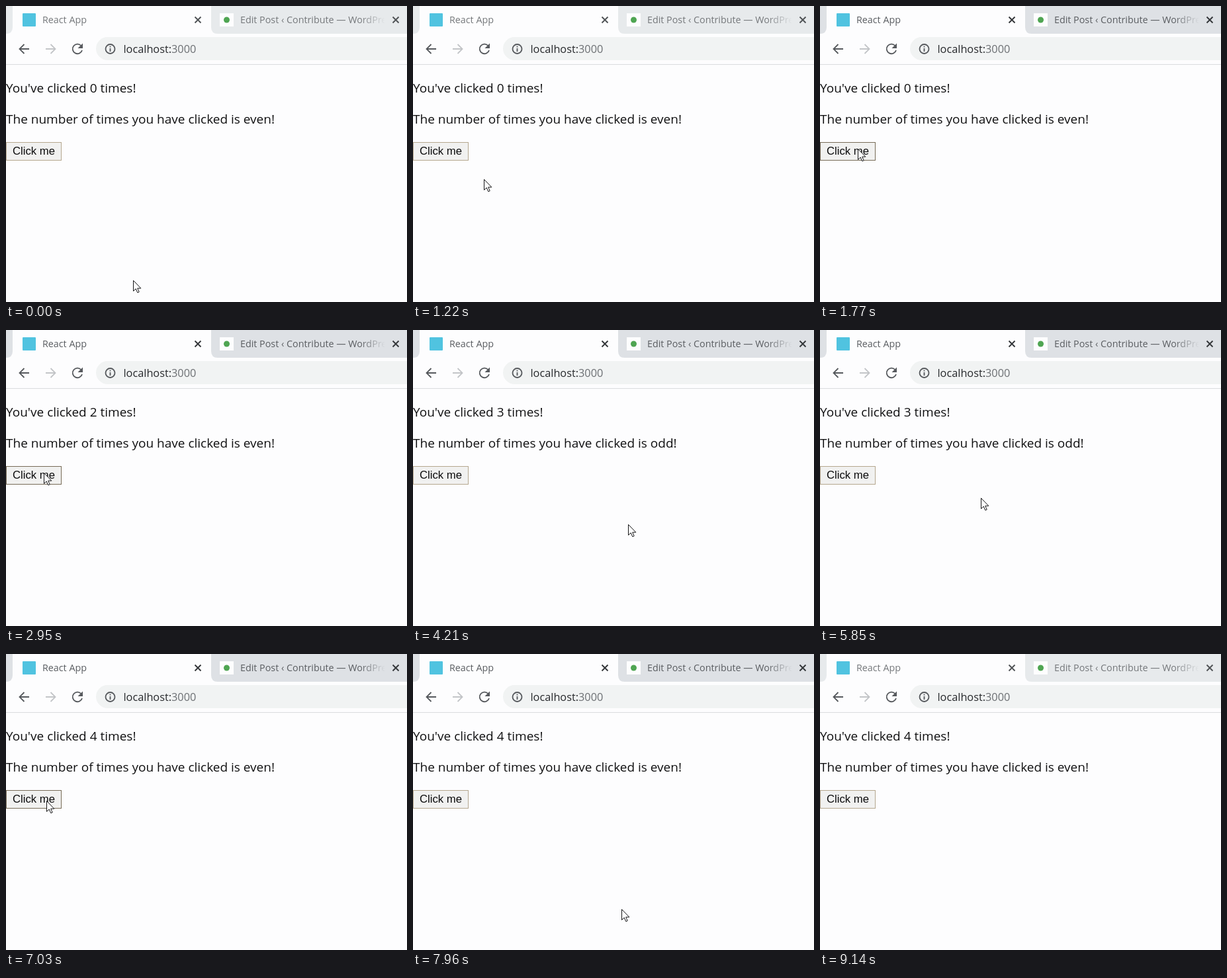
Write an HTML page that moves like this. It is 606 by 448 pixels and loops after 9190 ms.

```html
<!DOCTYPE html>
<html lang="en">
<head>
<meta charset="utf-8">
<title>Click counter</title>
<style>
  html, body { margin: 0; width: 100%; height: 100%; overflow: hidden; background: #fdfdfe; }
  svg { display: block; width: 606px; height: 448px; font-family: "Open Sans", "Noto Sans", sans-serif; }
  svg { --strip: #e7eaec; --title: #75787b; --close: #505356; }
  svg.focused { --strip: #dee1e5; --title: #5a5d61; --close: #34373a; }
  .strip { fill: var(--strip); }
  .title { fill: var(--title); font-size: 14.3px; }
  .close { stroke: var(--close); stroke-width: 1.9; }
  .url { font-size: 16.3px; fill: #27292c; }
  .page { font-size: 19px; fill: #101011; }
  .button { fill: #f1f1f0; stroke: #b5a78e; }
  .button.hover { stroke: #776b57; }
  .label { font: 16.7px "Liberation Sans", Arial, sans-serif; fill: #0b0b0c; }
  .icon { fill: none; stroke: #56595d; stroke-width: 1.8; }
</style>
</head>
<body>
<svg viewBox="0 0 606 448">
  <defs>
    <linearGradient id="fade" gradientUnits="userSpaceOnUse" x1="535" x2="573" y1="0" y2="0">
      <stop offset="0" style="stop-color: var(--title)"/>
      <stop offset="1" style="stop-color: var(--title); stop-opacity: 0"/>
    </linearGradient>
    <path id="cross" d="M-4.5 -4.5L4.5 4.5M4.5 -4.5L-4.5 4.5"/>
    <path id="arrow" d="M8 0H-6.5M0.5 -7L-6.5 0L0.5 7"/>
  </defs>
  <rect width="606" height="448" fill="#fdfdfe"/>

  <!-- Tabs -->
  <path class="strip" d="M0 0H10V32Q10 42 0 42ZM310 0H606V42H320Q310 42 310 32Z"/>
  <rect x="25" y="11" width="20" height="20" rx="1" fill="#50c3e0"/>
  <text class="title" x="55" y="26">React App</text>
  <use href="#cross" class="close" x="290" y="21"/>
  <rect x="323" y="11" width="21" height="20" fill="#fdfdfe"/>
  <circle cx="333.5" cy="21" r="4.5" fill="#4fa552"/>
  <text class="title" x="354" y="26" style="fill: url(#fade)">Edit Post ‹ Contribute — WordPress</text>
  <use href="#cross" class="close" x="589" y="21"/>

  <!-- Toolbar -->
  <use href="#arrow" class="icon" x="27" y="65"/>
  <use href="#arrow" class="icon" transform="translate(68 65) scale(-1 1)" style="stroke: #c3c5c8"/>
  <path class="icon" d="M113.4 60A7.3 7.3 0 1 0 115 67"/>
  <path d="M116 56.5V64H108.5Z" fill="#56595d"/>
  <rect x="136" y="47" width="500" height="35" rx="17.5" fill="#f1f3f3"/>
  <circle class="icon" cx="157.5" cy="65" r="7"/>
  <path class="icon" d="M157.5 64V69M157.5 60.8V62.6"/>
  <text class="url" x="177.5" y="71">localhost:<tspan fill="#6c6f73">3000</tspan></text>
  <path d="M0 88.5H606" stroke="#dadcdf"/>

  <!-- Page -->
  <text class="page" y="131">You've clicked <tspan id="count">0</tspan> times!</text>
  <text class="page" y="178">The number of times you have clicked is <tspan id="parity">even</tspan>!</text>
  <rect id="button" class="button" x="0.5" y="206.5" width="83" height="27"/>
  <text class="label" x="10" y="225">Click me</text>
  <path id="cursor" d="M.5 .5V16.5L4.2 13L6.8 18.8L9.2 17.8L6.7 12.2H11.8Z" fill="#fff" stroke="#151517"/>
</svg>
<script>
  const LOOP = 9190;
  const FOCUS = { gained: 1700, lost: 9140 };
  const CLICKS = [1780, 2750, 3850, 6940];

  // Pointer gestures; "bend" is the control point of a curved one
  const START = [192, 415];
  const GESTURES = [
    { from: 130, until: 1200, to: [107, 262] },
    { from: 1220, until: 1700, to: [57, 216] },
    { from: 4000, until: 4930, to: [427, 136], bend: [490, 405] },
    { from: 4930, until: 5240, to: [58, 180], bend: [240, 115] },
    { from: 5240, until: 5560, to: [413, 168], bend: [240, 275] },
    { from: 5560, until: 6270, to: [61, 222], bend: [368, 306] },
    { from: 7330, until: 8170, to: [300, 399], bend: [435, 290] },
    { from: 8400, until: 8600, to: [309, 450] }
  ];

  const $ = id => document.getElementById(id);
  const svg = document.querySelector("svg");

  const easeOut = u => 1 - (1 - u) ** 2;
  const mix = (a, b, u) => a.map((v, i) => v + (b[i] - v) * u);
  const curve = (a, b, c, u) => mix(mix(a, b, u), mix(b, c, u), u);

  function pointer(time) {
    let at = START;
    for (const { from, until, to, bend } of GESTURES) {
      if (time < from) break;
      const u = easeOut(Math.min(1, (time - from) / (until - from)));
      at = bend ? curve(at, bend, to, u) : mix(at, to, u);
    }
    return at.map(Math.round);
  }

  function draw(time) {
    const [x, y] = pointer(time);
    const count = CLICKS.filter(t => time >= t).length;
    svg.classList.toggle("focused", time >= FOCUS.gained && time < FOCUS.lost);
    $("count").textContent = count;
    $("parity").textContent = count % 2 ? "odd" : "even";
    $("button").classList.toggle("hover", x < 84 && y >= 206 && y < 234);
    $("cursor").setAttribute("transform", `translate(${x} ${y})`);
  }

  function tick() {
    draw(performance.now() % LOOP);
    requestAnimationFrame(tick);
  }
  tick();
</script>
</body>
</html>
```
